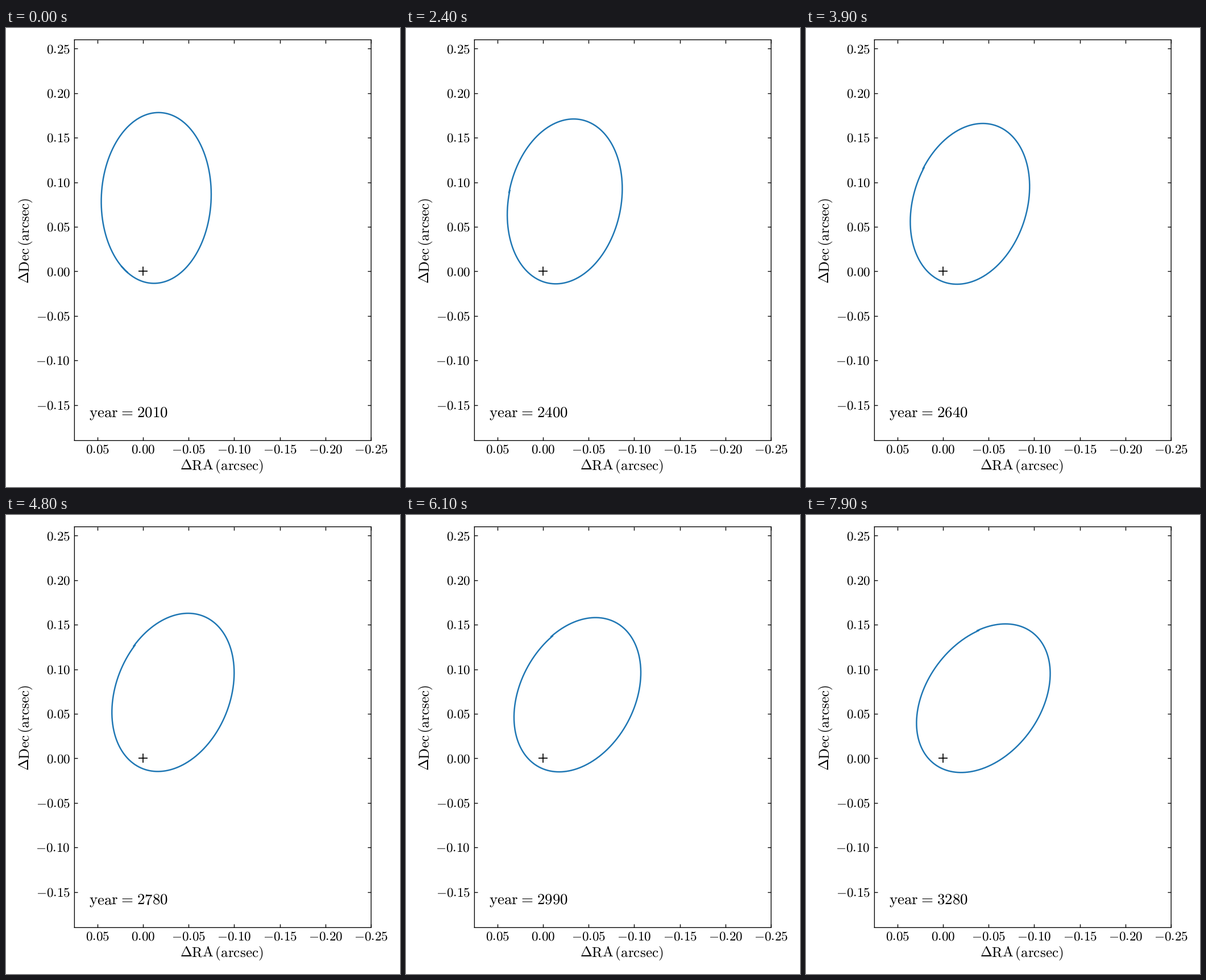
Animation, 693 px wide and 808 px high, one loop 8 s. Source, as a matplotlib script:

```python
import numpy as np
import matplotlib.pyplot as plt
from matplotlib.animation import FuncAnimation

W, H, DPI = 693, 808, 64
PT = 72 / DPI  # points per pixel
plt.rcParams["mathtext.fontset"] = "cm"
plt.rcParams["text.hinting"] = "no_hinting"

# Orbit constants (arcsec); each frame advances slightly more than one period
ECC = 0.8843
Q = np.sqrt(1 - ECC**2)
A, B, F, G = -0.0932, 0.0165, 0.0480, 0.1240
PRECESSION = np.radians(12.15 / 60)
PHASE, DRIFT = 0.0057, 0.00323
START, STEP = 2010.4, 16.05
FRAMES = 80


def eccentric(mean):
    """Solve Kepler's equation by bisection."""
    lo, hi = mean - 1, mean + 1
    for _ in range(50):
        mid = (lo + hi) / 2
        if mid - ECC * np.sin(mid) < mean:
            lo = mid
        else:
            hi = mid
    return mid


def orbit(k):
    phase = PHASE + DRIFT * k
    e0 = eccentric(2 * np.pi * phase)
    e1 = eccentric(2 * np.pi * (phase + 1 + DRIFT))
    E = np.linspace(e0, e1, 800)
    u, v = np.cos(E) - ECC, Q * np.sin(E)
    nu = np.unwrap(np.arctan2(v, u))
    w = PRECESSION * (k + nu / (2 * np.pi) - 0.5)
    c, s = np.cos(w), np.sin(w)
    p, q = u * c - v * s, u * s + v * c
    return B * p + G * q, A * p + F * q


def label(x, y, s, px, ha="center", **kw):
    return fig.text(x / W, 1 - y / H, s, fontsize=px * PT, ha=ha,
                    va="baseline", color="black", **kw)


def year_text(k):
    year = int(round((START + STEP * k) / 10) * 10)
    return rf"$\mathrm{{year}}\hspace{{0.08}}=\hspace{{0.08}}{year}$"


fig = plt.figure(figsize=(W / DPI, H / DPI), dpi=DPI, facecolor="white")
x0, x1, top, bottom = 120.4, 642.2, 20.7, 726.3
ax = fig.add_axes([x0 / W, 1 - bottom / H, (x1 - x0) / W, (bottom - top) / H])
ax.set_xlim(0.075, -0.25)
ax.set_ylim(-0.19, 0.26)
xticks = np.arange(1, -6, -1) * 0.05
yticks = np.arange(-3, 6) * 0.05
ax.set_xticks(xticks)
ax.set_yticks(yticks)
ax.tick_params(direction="in", length=6 * PT, width=1.36 * PT, top=True,
               right=True, labelbottom=False, labelleft=False)
for spine in ax.spines.values():
    spine.set_linewidth(1.36 * PT)
    spine.set_snap(False)

for t in xticks:
    label(x0 + (0.075 - t) / 0.325 * (x1 - x0), 748.5, f"${t + 0.0:.2f}$", 23.2)
for t in yticks:
    y = top + (0.26 - t) / 0.45 * (bottom - top)
    label(112.8, y + 7.7, f"${t + 0.0:.2f}$", 23.2, ha="right")
label(379.5, 779.2, r"$\Delta\mathrm{RA}\,(\mathrm{arcsec})$", 25.1)
label(41.5, 374.5, r"$\Delta\mathrm{Dec}\,(\mathrm{arcsec})$", 25.1,
      rotation=90, rotation_mode="anchor")
year = label(146.5, 685, year_text(0), 26.9, ha="left")

ax.plot(0, 0, "+", color="black", ms=16 * PT, mew=1.7 * PT)
line, = ax.plot(*orbit(0), color="#1f77b4", lw=2.5 * PT)


def update(k):
    line.set_data(*orbit(k))
    year.set_text(year_text(k))
    return line, year


anim = FuncAnimation(fig, update, frames=FRAMES, interval=100,
                     repeat=True, repeat_delay=0, blit=False)
plt.show()
```
